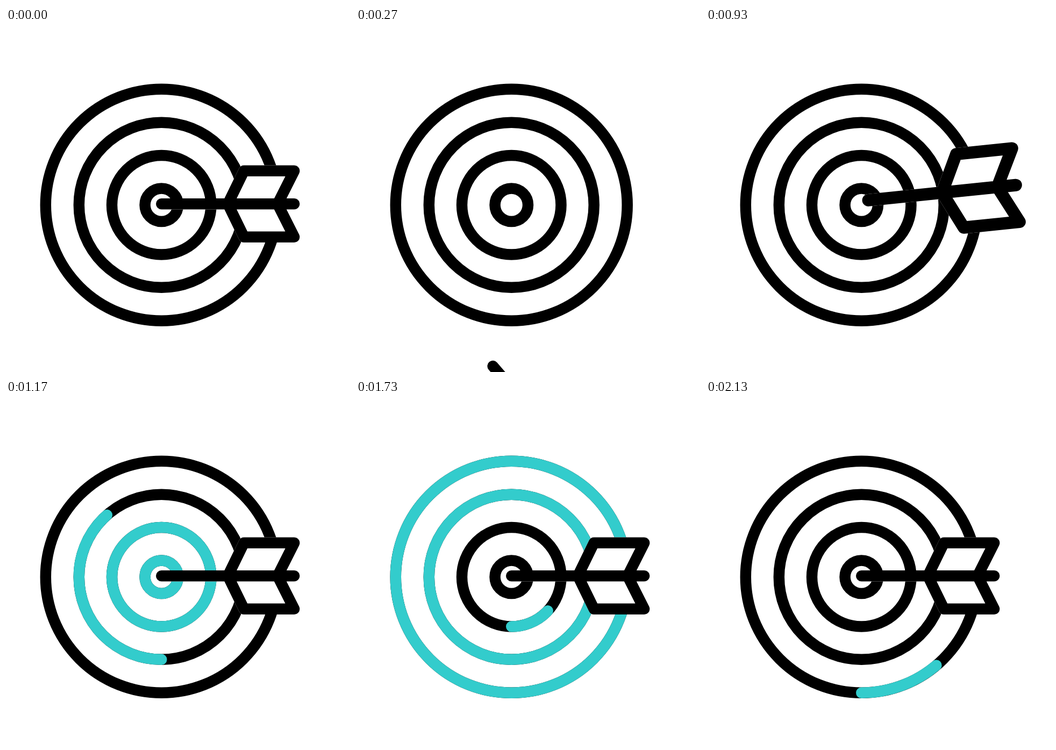
Write an HTML page with a canvas that moves like this. It is 640x640 px and loops after 2170 ms.

```html
<!DOCTYPE html>
<html lang="en">
<head>
<meta charset="utf-8">
<title>Target</title>
<style>
  html, body { margin: 0; width: 100%; height: 100%; overflow: hidden; background: #fff; }
  canvas { display: block; width: 640px; height: 640px; }
</style>
</head>
<body>
<canvas id="stage" width="640" height="640"></canvas>
<script>
const ctx = document.getElementById('stage').getContext('2d');
const LOOP = 2170, STEP = 100 / 3, TAU = Math.PI * 2;
const CX = 289.25, CY = 329.25, LINE = 20.5;
const RADII = [30.75, 92.25, 153.5, 215.5];
const TOTAL = RADII.reduce((a, b) => a + b);
const TIP = { x: 289.25, y: 327.3 };
const HALF = 123.5, FIN = 61.5;

const clamp = v => Math.min(1, Math.max(0, v));
const ramp = (n, from, to) => clamp((n - from) / (to - from));

function arc(r, from, to, color) {
  ctx.beginPath();
  ctx.arc(CX, CY, r, TAU / 4 + from * TAU, TAU / 4 + to * TAU);
  if (to - from >= 1) ctx.closePath();
  ctx.strokeStyle = color;
  ctx.stroke();
}

// One trim runs through all rings as if they were a single path.
function drawRings(n) {
  const tail = ramp(n, 48.27, 64.81) * TOTAL;
  const head = ramp(n, 29.3, 44.7) * TOTAL;
  let start = 0;
  for (const r of RADII) {
    const from = clamp((tail - start) / r);
    const to = clamp((head - start) / r);
    arc(r, 0, 1, '#000');
    if (to > from) arc(r, from, to, '#3cc'.replace('#3cc', '#33cccc'));
    start += r;
  }
}

function arrowPath() {
  const path = new Path2D();
  path.moveTo(0, 0);
  path.lineTo(2 * HALF, 0);
  for (const side of [-1, 1]) {
    path.moveTo(HALF, 0);
    path.lineTo(HALF + 30, side * FIN);
    path.lineTo(2 * HALF, side * FIN);
    path.lineTo(2 * HALF - 31, 0);
    path.closePath();
  }
  return path;
}
const ARROW = arrowPath();

function drawArrow({ x, y, angle, scale }) {
  ctx.save();
  ctx.translate(x, y);
  ctx.rotate(angle * Math.PI / 180);
  ctx.scale(scale, scale);
  ctx.fillStyle = '#fff';
  ctx.fill(ARROW);
  for (const color of ['#fff', '#000']) {
    ctx.strokeStyle = color;
    ctx.stroke(ARROW);
  }
  ctx.restore();
}

// Drops off the board, turning about its middle.
function fall(n) {
  const k = n / 4, p = Math.pow(k, 1.2);
  const angle = 21.4 * p, a = angle * Math.PI / 180;
  return {
    x: TIP.x + HALF - 24.5 * Math.pow(k, 1.66) - HALF * Math.cos(a),
    y: TIP.y + 172 * p - HALF * Math.sin(a),
    angle, scale: 1
  };
}

// Flies in from the right, large, and slows down into the centre.
function flyIn(n) {
  const w = Math.max(0, 30.05 - n) / 11.05, q = w * w;
  return {
    x: TIP.x + 370 * q,
    y: TIP.y - 13 * q - 193 * q * (1 - q),
    angle: w * (-42.9 + w * (48.5 + w * 66.4)),
    scale: 1 + 3.4 * q
  };
}

function draw(time) {
  const n = Math.floor((time % LOOP + 3.4) / STEP) % 65;
  ctx.fillStyle = '#fff';
  ctx.fillRect(0, 0, 640, 640);
  ctx.lineWidth = LINE;
  ctx.lineCap = ctx.lineJoin = 'round';
  drawRings(n);
  if (n < 9) drawArrow(fall(n));
  else if (n >= 19) drawArrow(flyIn(n));
}

const begin = performance.now();
function tick() {
  draw(performance.now() - begin);
  requestAnimationFrame(tick);
}
tick();
</script>
</body>
</html>
```
